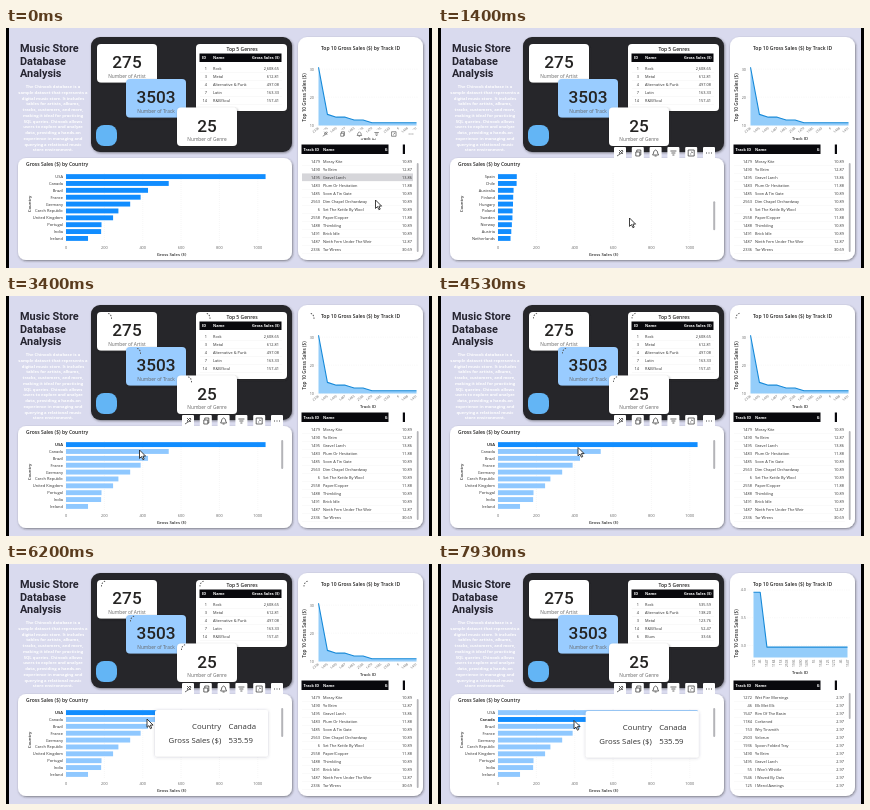
Write an HTML page that moves like this. It is 426x240 px and loops after 8 s.

```html
<!DOCTYPE html>
<html lang="en">
<head>
<meta charset="utf-8">
<title>Music Store Database Analysis</title>
<style>
html, body { margin: 0; width: 100%; height: 100%; overflow: hidden; background: #000; }
svg { display: block; width: 100vw; height: 100vh; }
text { font-family: "Open Sans", "Noto Sans", sans-serif; font-size: 4px; fill: #303030; }
.din { font-family: Roboto, Inter, sans-serif; }
</style>
</head>
<body>
<svg id="stage" viewBox="0 0 426 240">
  <defs>
    <filter id="shadow" x="-10%" y="-10%" width="120%" height="125%">
      <feDropShadow dx="0.8" dy="1" stdDeviation="1.1" flood-color="#222" flood-opacity=".5"/>
    </filter>
    <filter id="glow" x="-10%" y="-10%" width="120%" height="125%">
      <feDropShadow dx="0" dy="0.4" stdDeviation="1.6" flood-color="#446" flood-opacity=".28"/>
    </filter>
    <clipPath id="listClip"><rect x="14" y="144.6" width="260" height="69.4"/></clipPath>
  </defs>
</svg>
<script>
const LOOP = 8000;
const BLUE = '#118dff', PALE = '#8fc8ff', DARK = '#26252b', HEAD = '#08080c', GREY = '#666';
const stage = document.getElementById('stage');

function add(parent, tag, attrs = {}, content) {
  const el = document.createElementNS('http://www.w3.org/2000/svg', tag);
  for (const k in attrs) el.setAttribute(k, attrs[k]);
  if (content !== undefined) el.textContent = content;
  parent.appendChild(el);
  return el;
}
const group = (parent = stage, attrs) => add(parent, 'g', attrs);
const rect = (p, x, y, w, h, fill, more) =>
  add(p, 'rect', { x, y, width: w, height: h, fill, ...more });
const panel = (p, x, y, w, h, rx, fill = '#fff') =>
  rect(p, x, y, w, h, fill, { rx, filter: 'url(#shadow)' });
const path = (p, d, more) => add(p, 'path', { d, fill: 'none', ...more });

// y is the vertical middle of the capitals
function label(p, s, x, y, size = 4, more = {}) {
  const { fill, weight, anchor, ...rest } = more;
  const style = `font-size:${size}px` + (fill ? `;fill:${fill}` : '') + (weight ? `;font-weight:${weight}` : '');
  return add(p, 'text', { x, y: y + size * 0.36, style, 'text-anchor': anchor || 'start', ...rest }, s);
}
const middle = { anchor: 'middle' }, right = { anchor: 'end' };
const turned = (p, s, x, y, size, deg = -90, more = middle) =>
  label(p, s, 0, 0, size, { ...more, transform: `translate(${x} ${y}) rotate(${deg})` });
const show = (el, on) => el.setAttribute('visibility', on ? 'inherit' : 'hidden');

rect(stage, 3, 0, 420, 240, '#d9daee');

// ---- headline and description
['Music Store', 'Database', 'Analysis'].forEach((s, i) =>
  label(stage, s, 14, 20.5 + i * 12.2, 10.9, { class: 'din', weight: 600, fill: '#252430' }));
['The Chinook database is a', 'sample dataset that represents a', 'digital music store. It includes',
  'tables for artists, albums,', 'tracks, customers, and more,', 'making it ideal for practicing',
  'SQL queries. Chinook allows', 'users to explore and analyze', 'data, providing a hands-on',
  'experience in managing and', 'querying a relational music', 'store environment.'
].forEach((s, i) => label(stage, s, 47, 58.5 + i * 5.75, 4.2, { ...middle, fill: '#fff', weight: 700 }));

// ---- dark panel with cards
panel(stage, 85, 9, 201, 115, 9, DARK);
panel(stage, 190, 16, 91, 67, 4);
[[91, 16, '275', 'Artist', '#fff'], [120, 51, '3503', 'Track', '#99ccff'], [171, 79.5, '25', 'Genre', '#fff']]
  .forEach(([x, y, n, what, fill]) => {
    panel(stage, x, y, 60, 38.5, 4, fill);
    label(stage, n, x + 30, y + 18, 17.2, { ...middle, class: 'din', weight: 500, fill: '#252423' });
    label(stage, 'Number of ' + what, x + 30, y + 32, 4.8, { ...middle, fill: GREY });
  });
rect(stage, 90, 97, 21, 21, '#63b5f5', { rx: 8 });

label(stage, 'Top 5 Genres', 236, 21, 5, { ...middle, weight: 600, fill: '#252423' });
rect(stage, 193.5, 25.5, 82, 8.5, HEAD);
label(stage, 'ID', 196, 29.7, 3.9, { fill: '#fff', weight: 700 });
label(stage, 'Name', 207, 29.7, 3.9, { fill: '#fff', weight: 700 });
label(stage, 'Gross Sales ($)', 273.5, 29.7, 3.9, { ...right, fill: '#fff', weight: 700 });

function genreTable(rows) {
  const g = group();
  rows.forEach(([id, name, sum], i) => {
    const y = 40.3 + i * 8;
    label(g, id, 201, y, 3.9, right);
    label(g, name, 207, y, 3.9);
    label(g, sum, 273, y, 3.9, right);
    rect(g, 194, y + 3.9, 82, 0.25, '#e4e4e4');
  });
  return g;
}
const genresAll = genreTable([[1, 'Rock', '2,608.65'], [3, 'Metal', '612.81'],
  [4, 'Alternative & Punk', '497.08'], [7, 'Latin', '163.33'], [14, 'R&B/Soul', '157.41']]);
const genresOne = genreTable([[1, 'Rock', '535.59'], [4, 'Alternative & Punk', '138.20'],
  [3, 'Metal', '123.76'], [14, 'R&B/Soul', '52.47'], [6, 'Blues', '33.66']]);

// ---- right panel: area chart
panel(stage, 292, 9, 125, 223, 9);
label(stage, 'Top 10 Gross Sales ($) by Track ID', 354.5, 20, 5, { ...middle, weight: 600, fill: '#252423' });

function areaChart(values, ids, x0, x1, base, toY, ticks, tilt) {
  const g = group();
  const step = (x1 - x0) / (values.length - 1);
  const line = values.map((v, i) => `${x0 + i * step} ${toY(v)}`).join('L');
  ticks.forEach(v => {
    path(g, `M309 ${toY(v)}H412`, { stroke: '#ddd', 'stroke-width': 0.3, 'stroke-dasharray': '.6 1.2' });
    label(g, v, 308, toY(v), 3.8, { ...right, fill: GREY });
  });
  path(g, `M${x0} ${base}L${line}V${base}Z`, { fill: '#94cdfa', stroke: 'none' });
  path(g, 'M' + line, { stroke: '#1689d8', 'stroke-width': 1.1, 'stroke-linejoin': 'round' });
  values.forEach((v, i) => turned(g, ids[i % ids.length], x0 + i * step, base + 2, 3.3, tilt, { ...right, fill: GREY }));
  return g;
}

// ---- right panel: track table
function trackTable(rows) {
  const g = group();
  rows.forEach(([id, name, sum], i) => {
    const y = 133.2 + i * 8.04;
    label(g, id, 314, y, 3.9, right);
    label(g, name, 317, y, 3.9);
    label(g, sum, 406, y, 3.9, right);
    rect(g, 296, y + 4, 111, 0.25, '#e8e8e8');
  });
  return g;
}
const tracks = [[1479, 'Mossy Kite', 10.89], [1490, 'Yo Brim', 12.87], [1495, 'Gravel Larch', 13.86],
  [1483, 'Plum Or Hesitation', 11.88], [1485, 'Soon A Tin Gate', 10.89], [2563, 'Dim Chapel Orchardway', 10.89],
  [6, 'Set The Kettle By Wool', 10.89], [2558, 'Paper/Copper', 11.88], [1488, 'Thimbling', 10.89],
  [1491, 'Brick Idle', 10.89], [1487, 'Ninth Fern Under The Weir', 12.87], [2336, 'Tar Wrens', 30.69]];
const fewTracks = [[1272, 'Wet Pier Mornings'], [46, 'Elk Met Elk'], [1547, 'Rim Of The Basin'],
  [1184, 'Corkened'], [153, 'Wry Tinsmith'], [2503, 'Velorun'], [1936, 'Spoon Folded Tray'],
  [1490, 'Yo Brim'], [1495, 'Gravel Larch'], [55, "I Won't Whittle"], [1546, 'I Waved By Oats'],
  [125, 'I Mend Awnings']].map(r => [...r, 2.97]);

const ranked = [...tracks].sort((a, b) => b[2] - a[2]);
const chartAll = areaChart(ranked.map(r => r[2]), ranked.map(r => r[0]), 312.5, 410.5, 97.5,
  v => 125.2 - 2.8 * v, [30, 20, 10], -40);
const chartOne = areaChart(Array.from({ length: 15 }, (_, i) => i < 2 ? 3.96 : 2.97), fewTracks.map(r => r[0]),
  315.5, 409.5, 93.5, v => 248 - 55.5 * v, [4, 3.5, 3].map(v => v.toFixed(1)), -90);
const axisName = label(stage, 'Track ID', 362, 110, 4.2, { ...middle, weight: 600 });
turned(stage, 'Top 10 Gross Sales ($)', 298, 69.5, 4.7, -90, { ...middle, weight: 600 });

const rowHover = rect(stage, 296, 145.4, 111, 7.6, '#d6d6da');
rect(stage, 295.5, 116.5, 87, 9.5, HEAD);
rect(stage, 396.8, 116.5, 2.2, 9.5, HEAD);
[['Track ID', 297.5], ['Name', 317], ['G', 378.8]].forEach(([s, x]) =>
  label(stage, s, x, 121.2, 3.9, { fill: '#fff', weight: 700 }));
const tableAll = trackTable(tracks), tableOne = trackTable(fewTracks);
const tableThumb = rect(stage, 410.8, 135, 1.8, 89, '#b4b4b8', { rx: 0.9 });

// ---- bottom panel: bar chart
panel(stage, 12, 130, 274, 102, 8);
label(stage, 'Gross Sales ($) by Country', 20, 136, 5, { weight: 600, fill: '#252423' });
turned(stage, 'Country', 23.5, 176, 4.3, -90, { ...middle, weight: 600 });
label(stage, 'Gross Sales ($)', 165.5, 226, 4.3, { ...middle, weight: 600 });
const barX = 60, perUnit = 0.1918, rowStep = 6.87;
for (let v = 0; v <= 1000; v += 200) {
  const x = barX + v * perUnit;
  path(stage, `M${x} 145V214`, { stroke: '#d8d8d8', 'stroke-width': 0.35, 'stroke-dasharray': '.6 1.4' });
  label(stage, v, x, 219.5, 3.9, { ...middle, fill: GREY });
}
const list = group(group(stage, { 'clip-path': 'url(#listClip)' }));
const bars = [['USA', 1040.49], ['Canada', 535.59], ['Brazil', 427.68], ['France', 389.07], ['Germany', 334.62],
  ['Czech Republic', 273.24], ['United Kingdom', 245.52], ['Portugal', 185.13], ['India', 183.15],
  ['Ireland', 114.84], ['Spain', 98.01], ['Chile', 97.02], ['Australia', 81.18], ['Finland', 79.2],
  ['Hungary', 78.21], ['Poland', 76.23], ['Sweden', 75.24], ['Norway', 72.27], ['Austria', 69.3],
  ['Netherlands', 65.34], ['Belgium', 60.39], ['Italy', 50.49], ['Denmark', 37.62], ['Argentina', 37.62]
].map(([name, sum], i) => {
  const y = 148.6 + i * rowStep;
  return {
    text: label(list, name, 57, y, 4, right),
    bar: rect(list, barX, y - 2.45, sum * perUnit, 4.9, BLUE)
  };
});
const listThumb = rect(stage, 275.2, 144, 2, 29, '#b4b4b8', { rx: 1 });

// ---- hover toolbars
const icons = ['M-1 -3L3 1M2 -3L3 -2L1 1L-1 0ZM0 1L-3 3', 'M-2 -1H2V3H-2ZM-1 -1V-3H3V2H2',
  'M-3 2H3L2 0V-1Q0 -5 -2 -1V0ZM-1 3H1', 'M-3 -2H3M-2 0H2M-1 2H1',
  'M-3 -3H3V3H-3ZM0 -1H1V0M-1 1H0', 'M-3 0h1M-.5 0h1M2 0h1'];
function toolbar(x, y, gap, size) {
  const g = group();
  icons.forEach((d, i) => {
    const tile = group(g, { transform: `translate(${x + i * gap} ${y}) scale(${size})` });
    rect(tile, -6, -6, 12, 12, '#fff', { rx: 1 });
    path(tile, d, { stroke: '#444', 'stroke-width': i === 5 ? 1.1 : 0.8 });
  });
  return g;
}
const chartTools = toolbar(182, 125, 17.8, 1);
const tableTools = toolbar(319, 106, 17.2, 0.75);

// ---- loading marks: a short trail of dots on a circle
const spinners = [[100.5, 22], [129.5, 57], [180.5, 85.5], [199, 22], [303, 22]].map(([x, y]) =>
  path(group(stage, { transform: `translate(${x} ${y})` }), 'M-5 0A5 5 0 0 1 0 -5',
    { stroke: '#555', 'stroke-width': 1, 'stroke-linecap': 'round', 'stroke-dasharray': '.6 2' }));

// ---- tooltip
const tip = group();
rect(tip, 149, 146, 113, 46.5, '#fff', { rx: 2, filter: 'url(#glow)' });
[['Country', 'Canada', 162.3], ['Gross Sales ($)', '535.59', 176]].forEach(([k, v, y]) => {
  label(tip, k, 215.2, y, 7.8, { ...right, fill: '#333' });
  label(tip, v, 222.5, y, 7.8, { fill: '#333' });
});

const cursor = path(stage, 'M0 0V8.4L2 6.6L3.4 9.7L4.7 9.1L3.4 6.1H6.1Z',
  { style: 'fill:#fff', stroke: '#111', 'stroke-width': 0.8, 'stroke-linejoin': 'round' });

// ---- motion: [time, x, y]
const route = [[0, 369.5, 172], [250, 369.5, 172], [950, 191.5, 190], [1500, 191.5, 190], [2150, 138, 160],
  [2300, 138, 160], [2800, 133.5, 154], [3500, 133.5, 154], [4400, 140, 151.5], [5000, 140, 151.5],
  [5500, 141, 155], [6300, 141, 155], [6700, 136, 156.5], [LOOP, 136, 156.5]];
const scroll = [[0, 0], [1000, 0], [1330, 10], [1560, 10], [1950, 0], [LOOP, 0]];

function at(keys, t) {
  const i = Math.max(1, keys.findIndex(k => k[0] >= t));
  const a = keys[i - 1], b = keys[i];
  const u = (t - a[0]) / (b[0] - a[0]);
  const e = u * u * (3 - 2 * u);
  return a.slice(1).map((v, j) => v + (b[j + 1] - v) * e);
}

function render(t) {
  const [x, y] = at(route, t);
  const [rows] = at(scroll, t);
  const picked = t < 2900 ? -1 : t < 6800 ? 0 : 1;
  const filtered = t >= 7500;
  const overChart = x < 286;

  cursor.setAttribute('transform', `translate(${x} ${y})`);
  list.setAttribute('transform', `translate(0 ${-rows * rowStep})`);
  listThumb.setAttribute('y', 144 + rows * 2.92);
  bars.forEach(({ text, bar }, i) => {
    bar.setAttribute('fill', picked < 0 || picked === i ? BLUE : PALE);
    text.style.fontWeight = picked === i ? 700 : 400;
  });

  show(rowHover, x > 340);
  show(tableTools, x > 292);
  show(chartTools, overChart);
  show(listThumb, overChart);
  show(tip, t >= 5600);
  tip.setAttribute('transform', t < 6800 ? 'translate(0 0)' : 'translate(-1.3 1)');

  [genresAll, chartAll, tableAll].forEach(g => show(g, !filtered));
  [genresOne, chartOne, tableOne].forEach(g => show(g, filtered));
  axisName.setAttribute('transform', filtered ? 'translate(0 -1.5)' : 'translate(0 0)');
  tableThumb.setAttribute('y', filtered ? 129 : 135);
  tableThumb.setAttribute('height', filtered ? 26 : 89);

  spinners.forEach(s => {
    show(s, picked >= 0 && !filtered);
    s.setAttribute('transform', `rotate(${(t - 6200) * 0.216})`);
  });
}

function tick(now) {
  render(now % LOOP);
  requestAnimationFrame(tick);
}
render(0);
requestAnimationFrame(tick);
</script>
</body>
</html>
```
